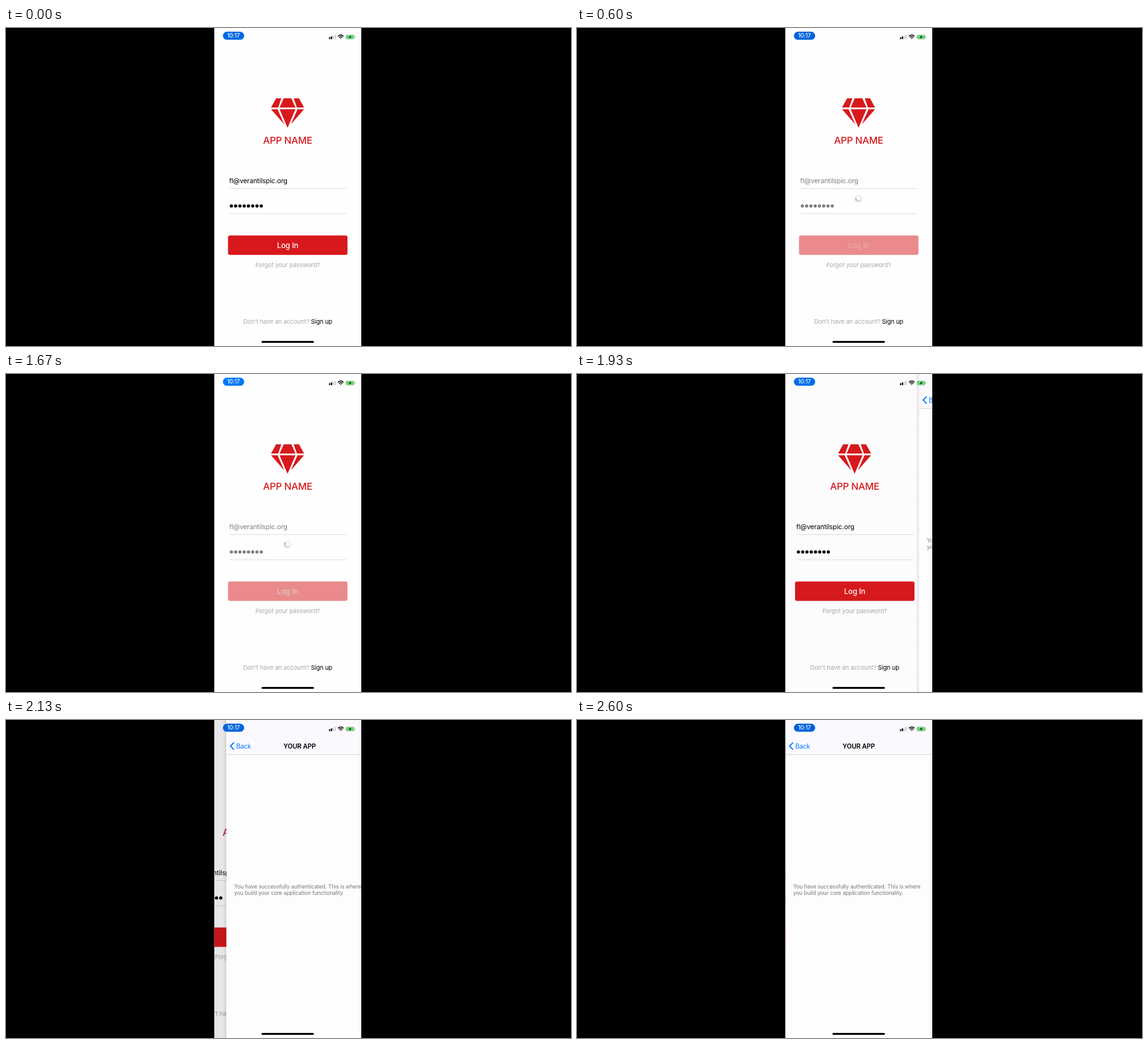
An HTML page that plays this animation: 889x500 px, repeating every 2.67 s.

```html
<!DOCTYPE html>
<html lang="en">
<head>
<meta charset="utf-8">
<title>Login flow</title>
<style>
  html, body { margin: 0; width: 100%; height: 100%; overflow: hidden; background: #000; }
  svg { display: block; width: 889px; height: 500px; }
  text { font-family: Inter, Roboto, sans-serif; letter-spacing: -.012em; white-space: pre; }
  .mid { text-anchor: middle; }
  .red { fill: #d7191d; }
  .small { font-size: 9.6px; fill: #a9a9ab; }
  .note { font-size: 8.5px; fill: #77767b; }
</style>
</head>
<body>
<svg viewBox="0 0 889 500">
  <defs>
    <clipPath id="screen"><path d="M327.7 0H559V500H327.7z"/></clipPath>
    <linearGradient id="edge">
      <stop offset="0" stop-color="#000" stop-opacity="0"/>
      <stop offset="1" stop-color="#000" stop-opacity=".1"/>
    </linearGradient>
  </defs>
  <rect width="889" height="500"/>
  <g clip-path="url(#screen)">
    <rect x="327" width="233" height="500" fill="#fefefe"/>

    <g id="login">
      <g class="red">
        <path d="M425 110.5H433.3L428.3 125H417zM437 110.5H449L455.5 125H430.5zM452.700 110.5H461L469 125H457.700z"/>
        <path d="M417 127.800H427.300L437.800 151.500zM430.500 127.800H455.500L443 157zM458.700 127.800H469L448.200 151.500z"/>
        <text class="mid" x="443.200" y="182" font-size="15.1" font-weight="500">APP NAME</text>
      </g>
      <g id="fields">
        <text x="351.300" y="244.200" font-size="10.6">fl@verantilspic.org</text>
        <g id="dots"></g>
      </g>
      <path d="M351.500 252.500H536M351.500 292H535.500" stroke="#dadadc" stroke-width=".9"/>
      <rect id="button" class="red" x="349.300" y="326.200" width="188" height="30.600" rx="3"/>
      <text id="label" class="mid" x="443.200" y="345.800" font-size="11.7" font-weight="500">Log In</text>
      <text class="small mid" x="443.200" y="375.600">Forgot your password?</text>
      <text class="small mid" x="443.200" y="464.600">Don't have an account? <tspan fill="#000">Sign up</tspan></text>
      <g id="spinner" stroke="#858588" stroke-width="1.1" stroke-linecap="round"></g>
    </g>
    <rect id="dim" x="327" width="233" height="500"/>

    <g id="home">
      <rect x="322.500" width="5.500" height="500" fill="url(#edge)"/>
      <rect x="328" width="232" height="500" fill="#fdfdfe"/>
      <rect x="328" width="232" height="54" fill="#fbf9fd"/>
      <path d="M328 54.400H560" stroke="#cfced3" stroke-width=".8"/>
      <path d="M340 35.300L334.400 41L340 46.700" fill="none" stroke="#007aff" stroke-width="1.800"/>
      <text x="343.400" y="44.600" font-size="10.2" fill="#007aff">Back</text>
      <text class="mid" x="443.200" y="44.600" font-size="10.2" font-weight="600">YOUR APP</text>
      <text class="note" x="340.300" y="264.800">You have successfully authenticated. This is where</text>
      <text class="note" x="340.300" y="275.100">you build your core application functionality.</text>
    </g>

    <rect id="pill" x="341.300" y="5.800" width="33.400" height="12.800" rx="6.400"/>
    <text class="mid" x="358" y="15.300" font-size="8.7" font-weight="500" fill="#fff">10:17</text>
    <path d="M508.300 14.500h2v3h-2zM511.200 13.300h2v4.200h-2z"/>
    <path d="M514.100 12.200h2v5.300h-2zM517 11h2v6.500h-2z" fill="#cfcfd1"/>
    <g fill="none" stroke="#000" stroke-width="1.300">
      <path d="M522.200 13Q526.700 9 531.200 13M524 14.900Q526.700 12.600 529.400 14.900"/>
      <path d="M525.400 16L526.700 17.500L528 16z" fill="#000" stroke="none"/>
    </g>
    <rect x="534.700" y="10.900" width="13.200" height="6.500" rx="1.900" fill="#69d875" stroke="#b5c8b8" stroke-width=".8"/>
    <path d="M549 13v2.400" stroke="#8fc998" stroke-width="1"/>
    <path d="M542.600 11.400L538.800 14.600H541L540.200 17L544 13.700H541.800z" fill="#142a17"/>
    <rect x="402" y="491.900" width="82.500" height="3" rx="1.500"/>
  </g>
</svg>
<script>
const LOOP = 2670, STEP = 200 / 3;
const PRESS = 330, RELEASE = 430, DONE = 1900, PUSH = 1906;
const WIDTH = 231, SPRING = 0.01826;
const el = id => document.getElementById(id);
const clamp = v => Math.min(1, Math.max(0, v));

function add(parent, tag, attrs) {
  const node = document.createElementNS("http://www.w3.org/2000/svg", tag);
  for (const name in attrs) node.setAttribute(name, attrs[name]);
  return el(parent).appendChild(node);
}

for (let i = 0; i < 8; i++) add("dots", "circle", { cx: 354.6 + i * 6.72, cy: 279.8, r: 2.55 });
const blades = Array.from({ length: 12 }, (_, i) => add("spinner", "path", {
  d: "M0 -3.4V-5.6", transform: `translate(442.900 268) rotate(${i * 30})`
}));

function draw(t) {
  const busy = t >= RELEASE && t < DONE;

  // Hotspot pill breathes between two blues
  const glow = 0.5 + 0.5 * Math.cos((t - 1400) / 1000 * Math.PI);
  el("pill").setAttribute("fill", `rgb(0,${95 + 29 * glow},${214 + 41 * glow})`);

  el("fields").setAttribute("opacity", busy ? 0.5 : 1);
  el("button").setAttribute("opacity", busy ? 0.5 : 1);
  const pressed = t >= PRESS && t < RELEASE;
  const label = el("label");
  label.setAttribute("fill", busy ? "#dfc7c9" : "#fff");
  label.setAttribute("opacity", pressed ? 0.2 : busy ? 0.2 + 0.8 * clamp((t - RELEASE) / 400) : 1);

  el("spinner").setAttribute("visibility", busy ? "visible" : "hidden");
  const head = Math.floor(t * 0.012 + 2.1);
  blades.forEach((blade, i) => {
    const age = (head - i + 24) % 12;
    blade.setAttribute("opacity", Math.max(0.25, 1 - age * 0.11));
  });

  // Critically damped push with parallax
  const s = Math.max(0, t - PUSH) * SPRING;
  const p = 1 - (1 + s) * Math.exp(-s);
  el("login").setAttribute("transform", `translate(${-0.3 * WIDTH * p})`);
  el("dim").setAttribute("opacity", 0.1 * p);
  el("home").setAttribute("transform", `translate(${WIDTH * (1 - p)})`);
  el("home").setAttribute("visibility", p > 0 ? "visible" : "hidden");
}

const start = performance.now();
function tick() {
  const t = (performance.now() - start) % LOOP;
  draw(Math.floor((t + 4) / STEP) * STEP);
  requestAnimationFrame(tick);
}
tick();
</script>
</body>
</html>
```
